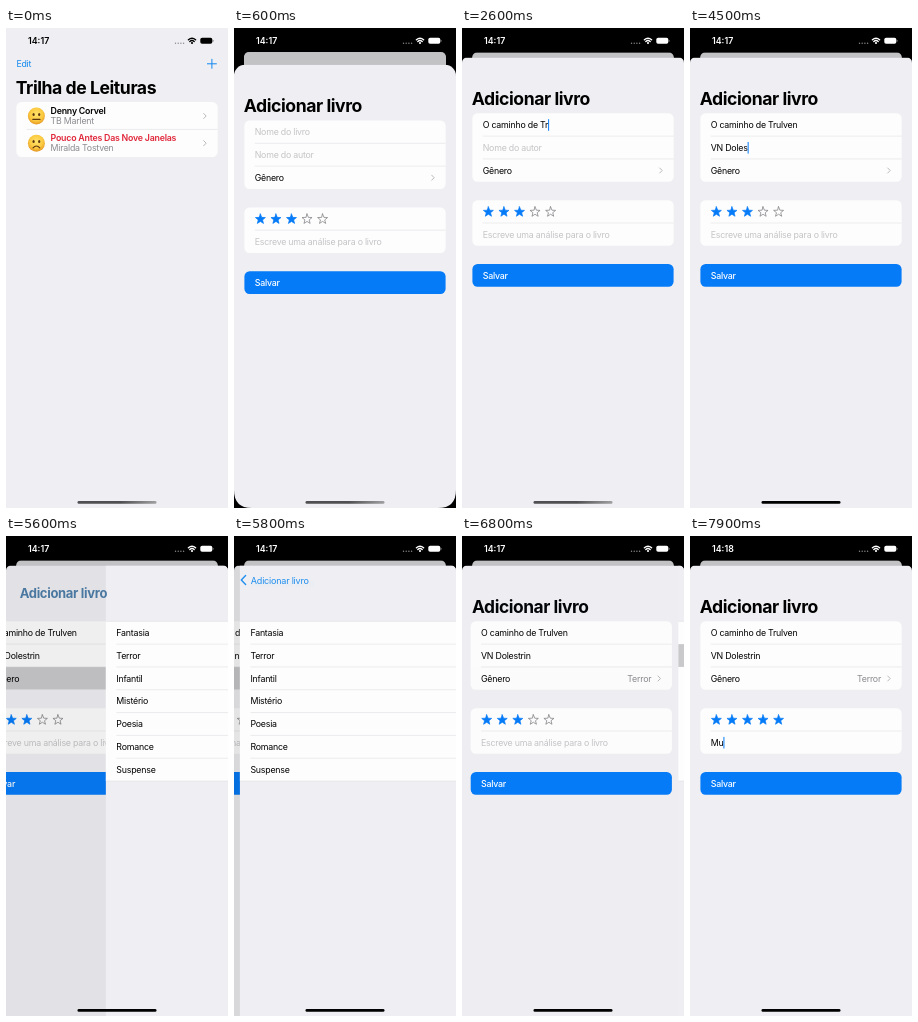
These frames come from a looping animation (222 by 480 pixels, 8000 ms). An HTML page:

```html
<!DOCTYPE html>
<html lang="pt">
<head>
<meta charset="utf-8">
<title>Lista de livros</title>
<style>
  html, body { margin: 0; width: 100%; height: 100%; overflow: hidden; background: #000; }
  svg { display: block; width: 100vw; height: 100vh; }
  text { font: 400 8.82px Inter, Roboto, sans-serif; letter-spacing: -.026em; white-space: pre; fill: #000; }
  .title { font-size: 17.6px; font-weight: 700; letter-spacing: -.025em; }
  .semi { font-weight: 600; }
  .hint { fill: #c4c4c7; }
  .grey { fill: #8b8b90; }
  .red { fill: #e0263a; }
  .tint { fill: #1288ee; }
  .white { fill: #fff; font-weight: 500; }
  .page { fill: #efeff3; }
  .card { fill: #fdfdfd; }
  .blue { fill: #067bf8; }
  .pressed { fill: #c9c9cc; }
  .rule { stroke: #d9d9dc; stroke-width: .5; }
  .line { fill: none; stroke-linecap: round; stroke-linejoin: round; }
  #status, #status text { fill: currentColor; }
  #status .line { stroke: currentColor; }
  #clock { letter-spacing: 0; }
</style>
</head>
<body>
<svg id="stage" viewBox="0 0 222 480" preserveAspectRatio="none"></svg>
<script>
const W = 222, H = 480, EDGE = 10.4, INSET = 20.7, ROW = 22.82, TITLE_X = 9.8;
const SHEET_TOP = 29.6, FORM = 85.3, REVIEW = 172.2, SAVE = 236;
const BOOK = 'O caminho de Trulven', AUTHOR = 'VN Dolestrin', NOTE = 'Muito bom';

// Markup helpers
const text = (x, mid, s, cls = '', attrs = '') =>
  `<text x="${x}" y="${mid + 3.2}" class="${cls}" ${attrs}>${s}</text>`;
const rect = (x, y, w, h, cls, attrs = '') =>
  `<rect x="${x}" y="${y}" width="${w}" height="${h}" class="${cls}" ${attrs}/>`;
const card = (y, h, cls = 'card') => rect(EDGE, y, W - 2 * EDGE, h, cls, 'rx="5.2"');
const rule = (y, x = INSET, end = W - EDGE) => `<path d="M${x} ${y}H${end}" class="rule"/>`;
const stroke = (d, color, width, attrs = '') =>
  `<path d="${d}" class="line" stroke="${color}" stroke-width="${width}" ${attrs}/>`;
const chevron = y => stroke(`M197.7 ${y - 2.5}l2.5 2.5l-2.5 2.5`, '#b9b9bd', 1);

const star = (x, y) => Array.from({ length: 10 }, (_, i) => {
  const r = i % 2 ? 2.25 : 5.25, a = i * Math.PI / 5 - Math.PI / 2;
  return `${(x + r * Math.cos(a)).toFixed(2)},${(y + r * Math.sin(a)).toFixed(2)}`;
}).join(' ');
const stars = [0, 1, 2, 3, 4].map(i =>
  `<polygon class="star line" points="${star(26.4 + 15.55 * i, 184)}" stroke-width=".7"/>`).join('');

const face = (y, mouth) => `<g transform="translate(30.4 ${y})">
  <circle r="8.5" fill="url(#gold)"/>
  <ellipse cx="-2.8" cy="-1.6" rx="1.1" ry="1.5" fill="#5a3510"/>
  <ellipse cx="2.8" cy="-1.6" rx="1.1" ry="1.5" fill="#5a3510"/>
  ${stroke(mouth, '#5a3510', 1.1)}</g>`;
const book = (mid, title, author, mouth, cls) =>
  face(mid, mouth) + text(44.6, mid - 5.2, title, 'semi ' + cls) +
  text(44.6, mid + 5, author, 'grey') + chevron(mid);

const field = (id, mid, hint) =>
  text(INSET, mid, hint, 'hint', `id="${id}Hint"`) + text(INSET, mid, '', '', `id="${id}"`) +
  rect(INSET, mid - 5.7, 1, 11.6, 'blue', `id="${id}Caret"`);

const genres = ['Fantasia', 'Terror', 'Infantil', 'Mistério', 'Poesia', 'Romance', 'Suspense'];
const genreRows = genres.map((name, i) =>
  text(10.5, FORM + ROW * (i + .5), name) +
  (i < genres.length - 1 ? rule(FORM + ROW * (i + 1), 10.5, W) : '')).join('');

const stage = document.getElementById('stage');
stage.innerHTML = `
<defs>
  <radialGradient id="gold" cy=".4" r=".65">
    <stop offset="0" stop-color="#ffe36b"/><stop offset=".6" stop-color="#fbc93f"/>
    <stop offset="1" stop-color="#e08a1c"/>
  </radialGradient>
  <linearGradient id="faded">
    <stop offset=".55" stop-color="#505053"/><stop offset="1" stop-color="#a0a0a3"/>
  </linearGradient>
  <clipPath id="homeClip"><rect id="homeShape" width="${W}" height="${H}"/></clipPath>
  <clipPath id="sheetClip"><rect id="sheetShape" y="${SHEET_TOP}" width="${W}" height="500"/></clipPath>
  <clipPath id="formClip">${card(FORM, 3 * ROW)}</clipPath>
</defs>
<rect width="${W}" height="${H}"/>
<g id="home" clip-path="url(#homeClip)">
  ${rect(0, 0, W, H, 'page')}
  ${text(EDGE, 35.8, 'Edit', 'tint')}
  ${stroke('M201.4 35.8H210.4M205.9 31.3V40.3', '#1288ee', 1, 'id="plus"')}
  <text x="${TITLE_X}" y="66" class="title">Trilha de Leituras</text>
  ${card(74, 55)}${rule(101.4)}
  ${book(88, 'Denny Corvel', 'TB Marlent', 'M-3.6 3.4H3.6', '')}
  ${book(115.2, 'Pouco Antes Das Nove Janelas', 'Miralda Tostven', 'M-3.4 4.7Q0 1 3.4 4.7', 'red')}
  <rect id="homeDim" width="${W}" height="${H}"/>
</g>
<g id="sheet"><g clip-path="url(#sheetClip)">
  ${rect(0, SHEET_TOP, W, 500, 'page')}
  <g id="form">
    ${card(FORM, 3 * ROW)}
    <g clip-path="url(#formClip)">${rect(EDGE, FORM + 2 * ROW, W - 2 * EDGE, ROW, 'pressed', 'id="genrePress"')}</g>
    ${rule(FORM + ROW)}${rule(FORM + 2 * ROW)}
    ${field('name', 96.9, 'Nome do livro')}
    ${field('author', 119.7, 'Nome do autor')}
    ${text(INSET, 142.5, 'Gênero')}${chevron(142.5)}
    ${text(191, 142.5, 'Terror', 'grey', 'id="genre" text-anchor="end"')}
    ${card(REVIEW, 2 * ROW)}${rule(REVIEW + ROW)}${stars}
    ${field('note', 206.6, 'Escreve uma análise para o livro')}
    ${card(SAVE, ROW, 'blue')}${text(INSET, SAVE + ROW / 2, 'Salvar', 'white')}
  </g>
  <rect id="formDim" y="${SHEET_TOP}" width="${W}" height="500"/>
  <g id="picker">
    ${rect(0, SHEET_TOP, W, 500, 'page')}
    ${rect(0, FORM, W, 7 * ROW, 'card')}
    ${rule(FORM, 0, W)}${rule(FORM + 7 * ROW, 0, W)}
    ${rect(0, FORM + ROW, W, ROW, 'pressed', 'id="pickPress"')}
    ${genreRows}
    ${stroke('M202.6 120.4l2.3 2.9l4.3-6.6', '#1288ee', 1.1, 'id="check"')}
  </g>
  <text id="bigTitle" class="title">Adicionar livro</text>
  <g id="back">
    ${stroke('M11.6 39.6l-4.3 4.4l4.3 4.4', '#1288ee', 1.4)}
    <text id="backText" class="tint">Adicionar livro</text>
  </g>
</g></g>
<path id="corners" d="M0 462Q0 480 18 480H0ZM222 462Q222 480 204 480H222Z"/>
<g id="status">
  ${text(22, 12.9, '14:17', 'semi', 'id="clock"')}
  <g fill="#8a8a8e">${[0, 1, 2, 3].map(i => `<circle cx="${169.5 + 2.7 * i}" cy="15.2" r=".7"/>`).join('')}</g>
  <path class="line" d="M182.4 11.8Q186 8.7 189.6 11.8M183.8 13.5Q186 11.5 188.2 13.5" stroke-width="1.4"/>
  <circle cx="186" cy="15" r="1.1"/>
  <rect x="194.3" y="9.8" width="12" height="6" rx="1.8"/>
  <rect x="206.7" y="11.9" width=".8" height="1.8" rx=".4" opacity=".6"/>
</g>
<rect id="bar" x="71.5" y="473.1" width="79" height="2.7" rx="1.35"/>`;

// Animation
const $ = id => document.getElementById(id);
const set = (id, name, value) => $(id).setAttribute(name, value);
const show = (id, on) => set(id, 'opacity', +on);
const lerp = (a, b, p) => a + (b - a) * p;

// Critically damped spring from 0 to 1
const spring = t => t <= 0 ? 0 : 1 - (1 + 18.26 * t) * Math.exp(-18.26 * t);

// Characters typed at time t, from [time, count] points
function typed(t, points) {
  let [t0, n0] = points[0];
  for (const [t1, n1] of points) {
    if (t < t1) return Math.floor(lerp(n0, n1, Math.max(0, (t - t0) / (t1 - t0))) + 1e-6);
    [t0, n0] = [t1, n1];
  }
  return n0;
}

function type(id, value, count, focused) {
  const node = $(id);
  node.textContent = value.slice(0, count);
  show(id + 'Hint', !count);
  show(id + 'Caret', focused);
  set(id + 'Caret', 'x', INSET + (count ? node.getComputedTextLength() : 0));
}

// The large title shrinks and turns blue, then gives way to the back button
function renderTitle(push) {
  const swap = Math.max(0, (push - .6) / .4);
  set('bigTitle', 'transform',
    `translate(${lerp(TITLE_X, 16.8, push)} ${lerp(77.2, 50, push)}) scale(${lerp(1, .53, push)})`);
  $('bigTitle').style.fill = `rgb(${18 * push} ${136 * push} ${238 * push})`;
  set('bigTitle', 'opacity', (1 - swap) * (1 - .55 * push));
  set('backText', 'transform',
    `translate(16.8 ${lerp(77.2, 47.2, push)}) scale(${lerp(2.1, 1, push)})`);
  set('back', 'opacity', swap);
}

function render(t) {
  const up = spring(t - .266);
  const moving = up > 0 && t < .85;
  const push = t < 6.45 ? spring(t - 5.499) : 1 - spring(t - 6.496);

  set('home', 'transform', `translate(${W * .0455 * up} ${24.4 * up}) scale(${1 - .091 * up})`);
  set('homeShape', 'rx', up ? 5.6 : 0);
  set('homeDim', 'opacity', .19 * up);
  set('plus', 'opacity', t >= .2 && t < .5 ? .3 : 1);
  set('sheet', 'transform', `translate(0 ${(H - SHEET_TOP) * (1 - up)})`);
  set('sheetShape', 'rx', moving ? 11 : 5);
  show('corners', moving);
  $('status').style.color = up > .5 ? '#fff' : '#000';
  $('clock').textContent = t < 7.3 ? '14:17' : '14:18';
  set('bar', 'fill', t < 2.8 ? 'url(#faded)' : '#000');

  type('name', BOOK, typed(t, [[1.2, 0], [2, 8], [2.6, 15], [2.7, 15], [3.2, 20]]), t >= 1.2 && t < 3.5);
  type('author', AUTHOR, typed(t, [[3.6, 0], [4, 2], [4.1, 2], [4.5, 8], [4.6, 8], [5, 12]]), t >= 3.5 && t < 5.3);
  type('note', NOTE, typed(t, [[7.6, 0], [7.7, 1], [7.8, 1], [7.9, 2]]), t >= 7.5);

  set('form', 'transform', `translate(${-.3 * W * push} 0)`);
  set('formDim', 'opacity', .1 * push);
  set('picker', 'transform', `translate(${W * (1 - push)} 0)`);
  set('genrePress', 'opacity', t < 5.3 ? 0 : t < 6.45 ? 1 : push);
  show('pickPress', t >= 6.1);
  show('check', t >= 6.2);
  show('genre', t >= 6.2);
  renderTitle(push);

  const rating = t < 7.1 ? 3 : 5;
  document.querySelectorAll('.star').forEach((node, i) => {
    const on = i < rating;
    node.style.fill = on ? '#067bf8' : 'none';
    node.style.stroke = on ? '#067bf8' : '#77777b';
  });
}

// The picture advances ten times a second
function tick() {
  render(Math.floor(performance.now() % 8000 / 100) / 10);
  requestAnimationFrame(tick);
}
tick();
</script>
</body>
</html>
```
